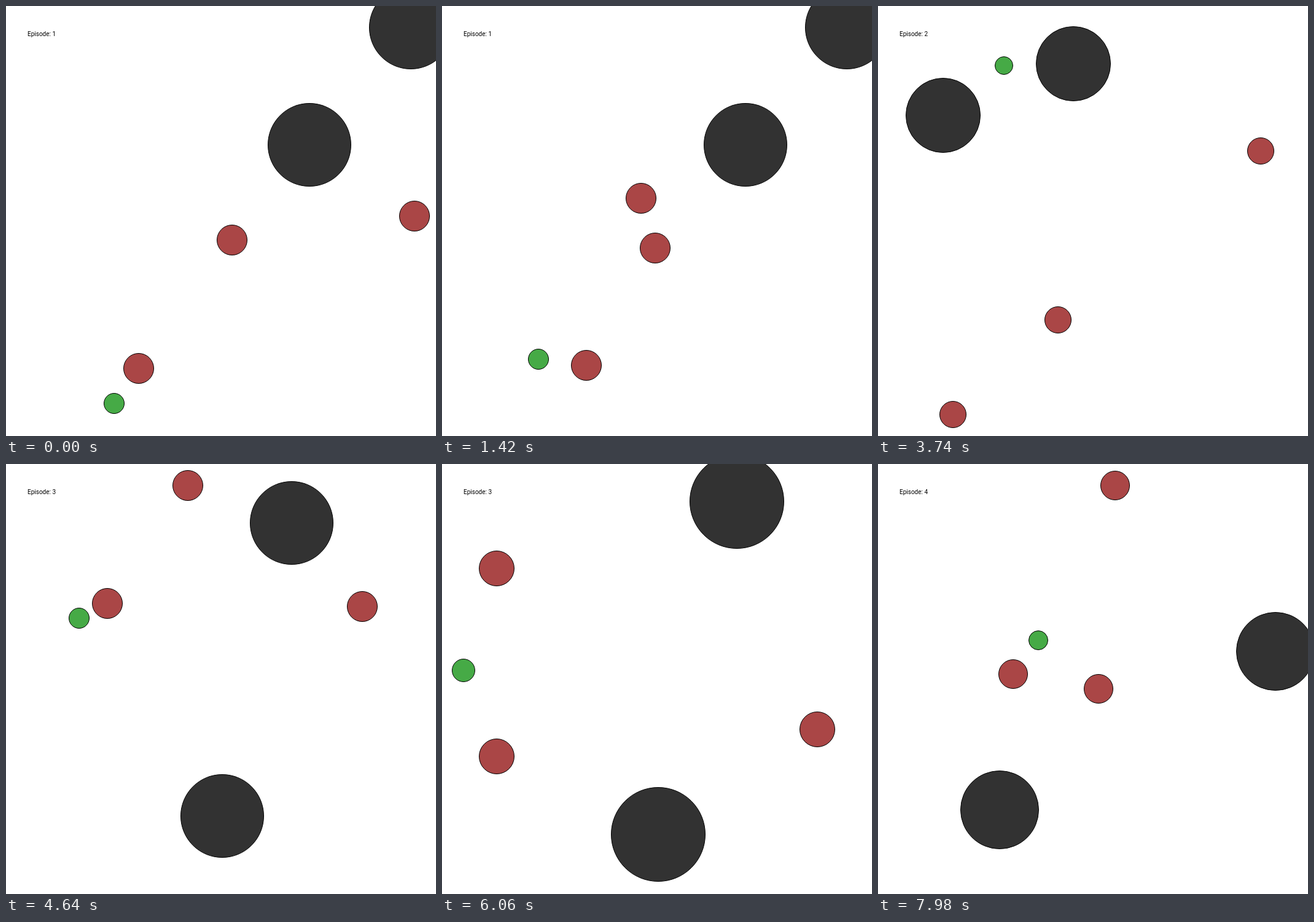
Recreate the animation shown at these times as an HTML page with a canvas. Size 700 by 700 pixels, loop 8 s.

```html
<!DOCTYPE html>
<html lang="en">
<head>
<meta charset="utf-8">
<title>Pursuit episodes</title>
<style>
  html, body { margin: 0; width: 100%; height: 100%; overflow: hidden; background: #fff; }
  canvas { display: block; }
</style>
</head>
<body>
<canvas id="stage" width="700" height="700"></canvas>
<script>
const ctx = document.getElementById('stage').getContext('2d');
const LOOP = 8000, EPISODE = 2320, FIRST = 20, STEP = 100;
const CENTRE = 350, REACH = 315;

const kinds = {
  runner: { size: 0.05, fill: '#46aa46' },
  chaser: { size: 0.075, fill: '#aa4646' },
  rock: { size: 0.2, fill: '#323232' }
};

// An agent passes `from` at the first step of the episode's span and `to` at the last.
const move = (from, to = from, bend = [0, 0]) => ({ from, to, bend });

const episodes = [
  {
    scale: 340, span: [0, 15], glide: 1,
    rocks: [[494, 226], [659, 35]],
    runner: move([176, 647], [157, 575]),
    chasers: [
      move([368, 381], [347, 394]),
      move([665, 342], [324, 313], [60, 100]),
      move([216, 590], [235, 585])
    ]
  },
  {
    scale: 305.5, span: [4, 21], glide: 1,
    rocks: [[106, 178], [318, 94]],
    runner: move([170, 102], [225, 95]),
    chasers: [
      move([299, 519], [290, 508]),
      move([623, 560], [623, 59]),
      move([122, 665])
    ]
  },
  {
    scale: 340, span: [0, 15], glide: 0.4,
    rocks: [[465, 96], [352, 573]],
    runner: move([119, 251], [73, 338]),
    chasers: [
      move([296, 35], [120.6, 191.8]),
      move([165, 227], [120.6, 461.2]),
      move([580, 232], [580, 422.4])
    ]
  },
  {
    scale: 325, span: [3, 11], glide: 1,
    rocks: [[197, 564.6], [649, 305]],
    runner: move([262, 258], [260.6, 286.8]),
    chasers: [
      move([386, 35], [386.4, 32.9]),
      move([551, 174], [359.2, 366.2]),
      move([219, 319], [219.2, 342])
    ]
  }
];

// Distance covered from rest under steady thrust, with drag and a top speed.
function travelled(steps) {
  let speed = 0, distance = 0;
  for (let i = 0; i < steps; i++) {
    speed = Math.min(1, speed * 0.75 + 0.3);
    distance += speed;
  }
  return distance;
}

function progress(step, [start, end], glide) {
  const origin = travelled(start);
  const p = (travelled(step) - origin) / (travelled(end) - origin);
  return p > 1 ? 1 + (p - 1) * glide : p;
}

// Whole pixels, tolerant of rounding errors just below an integer.
const whole = value => Math.floor(value + 0.01);

function disc(x, y, r, fill) {
  ctx.beginPath();
  ctx.arc(x, y, r - 0.5, 0, 2 * Math.PI);
  ctx.fillStyle = fill;
  ctx.fill();
  ctx.stroke();
}

function draw(time) {
  const index = Math.floor(time / EPISODE), local = time % EPISODE;
  const step = local < FIRST ? 0 : 1 + Math.floor((local - FIRST) / STEP);
  const { scale, span, glide, rocks, runner, chasers } = episodes[index];
  const p = progress(step, span, glide);
  const place = ({ from, to, bend }) =>
    from.map((a, i) => a + (to[i] - a) * p + bend[i] * p * (1 - p));
  const body = (kind, [x, y]) => ({ kind, x: x - CENTRE, y: y - CENTRE });
  const bodies = [
    ...chasers.map(c => body(kinds.chaser, place(c))),
    body(kinds.runner, place(runner)),
    ...rocks.map(r => body(kinds.rock, r))
  ];
  // The camera keeps the outermost body at a fixed distance from the centre.
  const zoom = REACH / Math.max(...bodies.flatMap(b => [Math.abs(b.x), Math.abs(b.y)]));

  ctx.fillStyle = '#fff';
  ctx.fillRect(0, 0, 700, 700);
  ctx.strokeStyle = '#000';
  ctx.lineWidth = 1;
  for (const { kind, x, y } of bodies)
    disc(whole(CENTRE + x * zoom), whole(CENTRE + y * zoom),
      whole(kind.size * scale * zoom), kind.fill);
  ctx.fillStyle = '#000';
  ctx.font = '10px Roboto, sans-serif';
  ctx.fillText('Episode: ' + (index + 1), 35, 49);
}

function tick(now) {
  draw(now % LOOP);
  requestAnimationFrame(tick);
}
draw(0);
requestAnimationFrame(tick);
</script>
</body>
</html>
```
